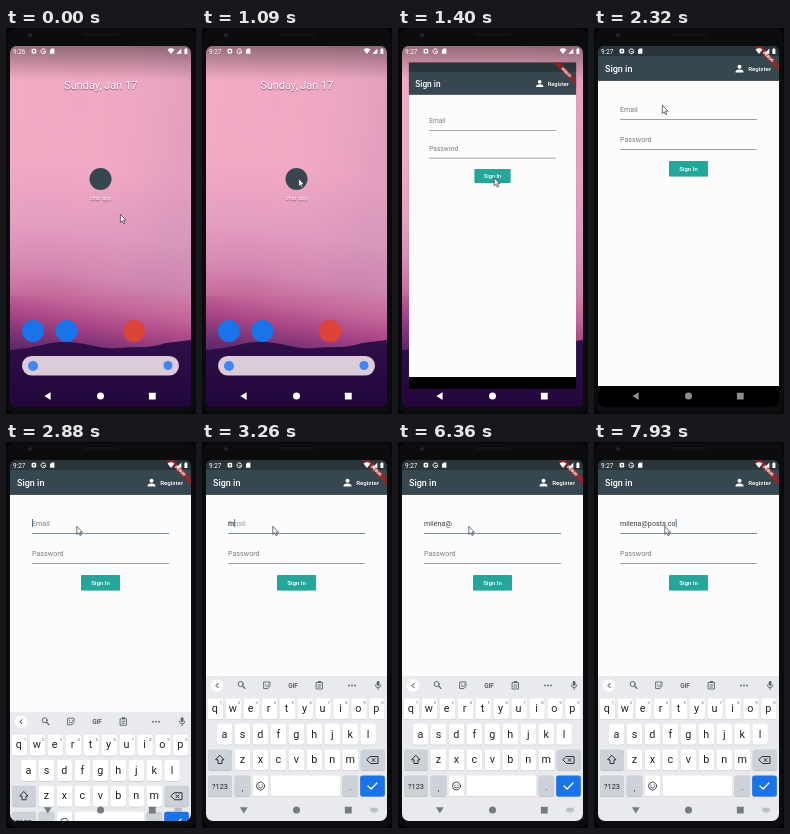
Recreate the animation shown at these times as an HTML page. Size 190 px wide and 386 px high, loop 8000 ms.

```html
<!DOCTYPE html>
<html lang="en">
<head>
<meta charset="utf-8">
<title>Sign in demo</title>
<style>
html, body { margin: 0; width: 100%; height: 100%; overflow: hidden; background: #050506; }
svg { display: block; width: 100%; height: 100%; font-family: Roboto, "Noto Sans", sans-serif; }
.line { fill: none; stroke-width: 1; stroke-linecap: round; stroke-linejoin: round; }
.soft { text-shadow: 0 .5px 1px rgba(60, 20, 50, .6); }
text { white-space: pre; }
</style>
</head>
<body>
<svg id="stage" viewBox="0 0 190 386"></svg>
<script>
const LOOP = 8000;
const stage = document.getElementById('stage');

const rect = (x, y, w, h, fill, r = 0, extra = '') =>
  `<rect x="${x}" y="${y}" width="${w}" height="${h}" rx="${r}" fill="${fill}" ${extra}/>`;
const disc = (x, y, r, fill) => `<circle cx="${x}" cy="${y}" r="${r}" fill="${fill}"/>`;
const path = (d, fill) => `<path d="${d}" fill="${fill}"/>`;
const line = (d, color, width = 1) =>
  `<path class="line" d="${d}" stroke="${color}" style="stroke-width:${width}"/>`;
const label = (x, y, size, fill, str, extra = '') =>
  `<text x="${x}" y="${y}" font-size="${size}" fill="${fill}" ${extra}>${str}</text>`;
const mid = 'text-anchor="middle"';
const medium = 'font-weight="500"';
const group = (id, content, extra = '') => `<g id="${id}" ${extra}>${content}</g>`;

const defs = `<defs>
  <linearGradient id="sky" x1=".08" y1="0" x2="0" y2="1">
    <stop offset="0" stop-color="#efa9c2"/><stop offset=".3" stop-color="#f2a9c4"/>
    <stop offset=".48" stop-color="#e39dbf"/><stop offset=".6" stop-color="#d386b0"/>
    <stop offset=".68" stop-color="#c3659a"/><stop offset=".74" stop-color="#aa4686"/>
    <stop offset=".79" stop-color="#7f3577"/><stop offset=".85" stop-color="#552567"/>
    <stop offset="1" stop-color="#3a1550"/>
  </linearGradient>
  <linearGradient id="haze" x1="0" y1="0" x2="1" y2=".3">
    <stop offset="0" stop-color="#ffb8cc" stop-opacity=".3"/>
    <stop offset=".5" stop-color="#e0a0bf" stop-opacity="0"/>
    <stop offset="1" stop-color="#b583ad" stop-opacity=".25"/>
  </linearGradient>
  <linearGradient id="scrim" x1="0" y1="0" x2="0" y2="1">
    <stop offset="0" stop-color="#000" stop-opacity=".38"/><stop offset="1" stop-color="#000" stop-opacity="0"/>
  </linearGradient>
  <linearGradient id="ground" x1="0" y1="0" x2="0" y2="1">
    <stop offset="0" stop-color="#300f49"/><stop offset="1" stop-color="#22063a"/>
  </linearGradient>
  <clipPath id="screen"><rect x="4" y="18" width="181" height="361" rx="7"/></clipPath>
  <clipPath id="reveal"><rect id="revealBox" x="4" y="18" width="181" height="361"/></clipPath>
  <clipPath id="window"><rect x="4" y="18" width="181" height="361"/></clipPath>
</defs>`;

const frame = rect(0, 0, 190, 386, '#050506') + rect(.5, .5, 189, 385, '#0b0c0e', 9)
  + disc(24, 7, 2.4, '#191b20') + disc(24, 7, 1, '#2a2d34')
  + rect(77, 5, 36, 3, '#111214', 1.5);

const wallpaper = rect(4, 18, 181, 361, 'url(#sky)') + rect(4, 18, 181, 250, 'url(#haze)')
  + rect(4, 18, 181, 34, 'url(#scrim)')
  + path('M4 322Q20 321 36 317T64 314 88 318 112 320 136 319 160 315L185 312V379H4Z', 'url(#ground)');

const launcher = label(94.8, 61.3, 10.95, '#fff', 'Sunday, Jan 17', mid + ' class="soft"')
  + disc(94.5, 151, 11, '#37474f')
  + label(94.5, 172, 5.7, '#fff', 'chat app', mid + ' class="soft"')
  + disc(27, 303, 11, '#1a73e8') + disc(60.5, 303, 11, '#1a73e8') + disc(128, 303, 11, '#db4437')
  + rect(16, 328, 157, 19.5, '#dccbd9', 9.7)
  + disc(27, 338, 5, '#4285f4') + disc(162, 337.5, 4.5, '#4285f4');

const statusBar = label(7, 25.6, 6.4, '#fff', '', 'id="clock"')
  + rect(25.6, 20.8, 4.6, 4.8, '#fff', 1) + disc(27.9, 23.2, 1.1, '#777')
  + line('M39.6 22.2A2.4 2.4 0 1 0 39.8 23.8H37.5', '#fff', 1)
  + path('M44 22L45.6 20.5H48.4V25.7H44Z', '#fff')
  + path('M161.5 21.5Q165 18.8 168.5 21.5L165 26Z', '#fff')
  + path('M175.4 20.5V25.8H170.4Z', '#fff')
  + rect(178.4, 21, 3, 5, '#fff', .5) + rect(179.2, 20.2, 1.4, 1, '#fff');

const banner = `<g transform="translate(174.4 28.6) rotate(45)">
  ${rect(-18, -2.7, 36, 5.4, '#b71c1c', 0, 'opacity=".63"')}
  ${label(0, 1.5, 4.1, '#fff', 'DEBUG', mid + ' font-weight="900"')}</g>`;

const field = 'letter-spacing=".066"';
const app = rect(4, 18, 181, 361, '#000') + rect(4, 52.6, 181, 305.4, '#fcfcfc')
  + rect(4, 18, 181, 34.6, '#37474f') + rect(4, 18, 181, 10, '#29353b')
  + label(11, 44.2, 9, '#fff', 'Sign in', medium)
  + disc(145.5, 38.8, 2, '#fff') + path('M141.6 44.6V43.4Q142 41.5 145.5 41.4T149.4 43.4V44.6Z', '#fff')
  + label(154.2, 43.1, 6.15, '#fff', 'Register', medium)
  + label(26, 83.8, 7.05, '#7d7d7d', 'Email', field + ' id="hint"')
  + label(26, 83.8, 7.05, '#3c3c3c', '', field + ' id="typed"')
  + rect(0, 77, .9, 8, '#4a6a8a', 0, 'id="caret"')
  + rect(26, 91, 137, .8, '#8a8a8a', 0, 'id="rule"')
  + label(26, 113.5, 7.05, '#7d7d7d', 'Password', field)
  + rect(26, 121, 137, .8, '#8a8a8a')
  + rect(75, 133.4, 39, 15.4, '#000', 1, 'opacity=".15"') + rect(75, 133, 39, 15.4, '#26a69a', 1)
  + label(94.5, 143, 6.1, '#fff', 'Sign In', mid + ' ' + medium)
  + banner;

const INK = '#202124', GREY = '#5f6368', DIM = '#cdd2d8';
const key = (x, y, w, fill = '#fff') =>
  rect(x - w / 2, y - 10, w, 21, '#b5b9be', 2.3) + rect(x - w / 2, y - 10.5, w, 21, fill, 2.3);
const row = (str, x0, y, digits) => [...str].map((c, i) => {
  const x = x0 + i * 17.95;
  return key(x, y, 15.6) + label(digits ? x - .6 : x, y + 3.2, 10.8, INK, c, mid)
    + (digits ? label(x + 5.5, y - 4.6, 4.2, GREY, (i + 1) % 10, mid) : '');
}).join('');

const tools = group('tools',
  line('M43 246.5L40.6 244', GREY, 1.1) + `<circle class="line" cx="38.7" cy="242" r="2.5" stroke="${GREY}"/>`
  + line('M62 240H68V244L66 246.5H62ZM63.5 242.2V242.3M66.5 242.2V242.3M63.5 244Q65 245.3 66.5 244', GREY, .9)
  + label(91, 245.6, 6.4, GREY, 'GIF', mid + ' font-weight="700"')
  + line('M114.5 240.5H120.5V247H114.5ZM116 243H119M116 245H118.5', GREY, .9) + rect(116, 239, 3, 2, GREY)
  + [147, 150, 153].map(x => disc(x, 243.5, .9, GREY)).join(''));

const words = group('words',
  rect(68, 238, .6, 11, '#c4c8cc') + rect(119, 238, .6, 11, '#c4c8cc')
  + [44, 94, 144].map((x, i) => label(x, 246.2, 7.9, i === 1 ? INK : GREY, '', `${mid} id="word${i}"`)).join('')
  + label(94, 248.8, 5, GREY, '@posta.com', mid + ' id="domain"'));

const keyboard = rect(4, 234, 181, 145, '#e8eaed')
  + disc(15, 243.5, 6.2, '#fff') + group('chevron', line('M1 -2L-1 0L1 2', INK, 1))
  + tools + words
  + rect(174.7, 239, 2.8, 5, GREY, 1.4) + line('M173.3 243Q173.5 245.6 176.1 245.7T178.9 243M176.1 245.8V247.5', GREY, .9)
  + row('qwertyuiop', 13.4, 267, true) + row('asdfghjkl', 22.5, 292.3) + row('zxcvbnm', 40.5, 318)
  + key(18, 318, 24, DIM) + line('M18 313.5L22 317.8H20V321.5H16V317.8H14Z', INK, .9)
  + key(170.7, 318, 24, DIM) + line('M168.5 314.5H176V321.5H168.5L165 318ZM170 316.5L173 319.5M173 316.5L170 319.5', INK, .9)
  + key(18, 344, 24, DIM) + label(18, 346.6, 7.4, INK, '?123', mid)
  + key(40.5, 344, 15.6, DIM) + label(40.5, 349, 8, INK, ',', mid)
  + key(58.5, 344, 15.6) + `<circle class="line" cx="58.5" cy="344" r="4" stroke="${INK}" style="stroke-width:.8"/>`
  + disc(57, 343, .6, INK) + disc(60, 343, .6, INK) + line('M56.5 345Q58.5 347.3 60.5 345', INK, .8)
  + key(103.5, 344, 69.6) + key(148.3, 344, 15.6, DIM) + label(148.3, 348, 8, INK, '.', mid)
  + key(170.5, 344, 24.6, '#1a73e8') + line('M166 344L169.1 347L175 341', '#fff', 1.3);

const nav = '<path id="back" d="M44.6 364.2V372L38.4 368.1Z" fill="currentColor"/>'
  + disc(94.5, 368.1, 3.5, 'currentColor') + rect(142.9, 364.8, 6.8, 6.8, 'currentColor', .4)
  + group('kbIcon', rect(168.5, 365.8, 7.2, 4, 'currentColor', .5)
    + path('M170.7 370.4H173.5L172.1 371.8Z', 'currentColor'), 'opacity=".4"');

const pointer = '<path d="M0 0V8.2L1.9 6.5L3.2 9.3L4.5 8.7L3.2 5.9H5.7Z" fill="#fff" stroke="#222" stroke-width=".65" stroke-linejoin="round"/>';

stage.innerHTML = defs + frame + `<g clip-path="url(#screen)">${wallpaper}
  ${group('launcher', launcher)}
  <g clip-path="url(#reveal)">${group('app', app, 'clip-path="url(#window)"')}</g>
  ${group('keyboard', keyboard)}${statusBar}${group('nav', nav)}${group('pointer', pointer)}</g>`;

const ui = {};
stage.querySelectorAll('[id]').forEach(e => ui[e.id] = e);
const set = (id, attrs) => { for (const k in attrs) ui[id].setAttribute(k, attrs[k]); };
const show = (id, on) => set(id, { visibility: on ? 'visible' : 'hidden' });
const write = (id, str) => { if (ui[id].textContent !== str) ui[id].textContent = str; };

// Progress 0..1 that rises in n equal steps, first at a and last at b.
const steps = (t, a, b, n) =>
  t < a ? 0 : Math.min(n, 1 + Math.floor((t - a) * (n - 1) / (b - a) + 1e-6)) / n;
const lerp = (a, b, p) => a + (b - a) * p;

const entry = 'milena@posta.co';
const keyTimes = [3260, 3490, 3890, 4040, 4190, 4350, 5970, 6680, 6830, 7000, 7070, 7320, 7540, 7700, 7930];
const guesses = [
  [3340, 'm', 'me', 'my'],
  [3490, 'mi', 'mind', 'mine'],
  [4040, 'mile', 'miles', 'mild'],
  [4190, 'milen', 'milena', 'Milena'],
  [4500, 'milena', 'milena', 'Milena']
];
const moves = [
  [70, 530, 7, 96.6, 150.5],
  [1240, 1400, 3, 96.2, 149.8],
  [2170, 2320, 3, 68.3, 77.3],
  [2490, 2650, 3, 70.8, 84.3]
];

function draw(t) {
  let x = 114.4, y = 186.3;
  for (const [a, b, n, tx, ty] of moves) {
    const p = steps(t, a, b, n);
    x = lerp(x, tx, p);
    y = lerp(y, ty, p);
  }
  set('pointer', { transform: `translate(${x} ${y})` });
  write('clock', t < 1000 ? '9:26' : '9:27');

  const open = steps(t, 1240, 1640, 6);
  const scale = 1 - .3 * (1 - open) ** 2;
  set('launcher', { opacity: Math.max(0, 1 - open * 3) });
  set('app', {
    opacity: Math.min(1, open * 2),
    transform: `translate(94.5 238) scale(${scale}) translate(-94.5 -238)`
  });
  set('revealBox', { height: 361 - 240 * (1 - scale) });

  const focus = t >= 2650;
  set('rule', { fill: focus ? '#54758f' : '#8a8a8a' });
  const rise = steps(t, 2800, 3030, 4);
  show('keyboard', rise > 0);
  set('keyboard', { transform: `translate(0 ${145 * (1 - rise) ** 2})` });

  const grey = Math.round(lerp(255, 140, steps(t, 1780, 1860, 2)));
  ui.nav.style.color = rise ? '#777b80' : `rgb(${grey},${grey},${grey})`;
  set('back', { transform: t >= 2490 ? 'rotate(-90 41.8 368.1)' : '' });
  show('kbIcon', t >= 2650);

  const typed = entry.slice(0, keyTimes.filter(k => t >= k).length);
  write('typed', typed);
  set('hint', { opacity: t < 3260 ? 1 : .75 * (1 - steps(t, 3340, 3490, 3)) });
  const end = typed ? ui.typed.getComputedTextLength() : 0;
  set('caret', { x: 26 + end });
  show('caret', focus && !(t >= 5040 && t < 5510) && !(t >= 6360 && t < 6680));

  const guess = guesses.filter(g => t >= g[0]).pop();
  const suggesting = !!guess && t < 6140;
  const full = t >= 4500;
  ui.words.style.display = suggesting ? '' : 'none';
  ui.tools.style.display = suggesting ? 'none' : '';
  ui.domain.style.display = full ? '' : 'none';
  if (suggesting) for (let i = 0; i < 3; i++) write('word' + i, guess[i + 1]);
  set('word1', { y: full ? 241.6 : 246.2, 'font-size': full ? 7 : 7.9 });
  set('chevron', { transform: `translate(15 243.5) scale(${suggesting ? -1 : 1} 1)` });
}

const start = performance.now();
function tick() {
  draw((performance.now() - start) % LOOP);
  requestAnimationFrame(tick);
}
tick();
</script>
</body>
</html>
```
